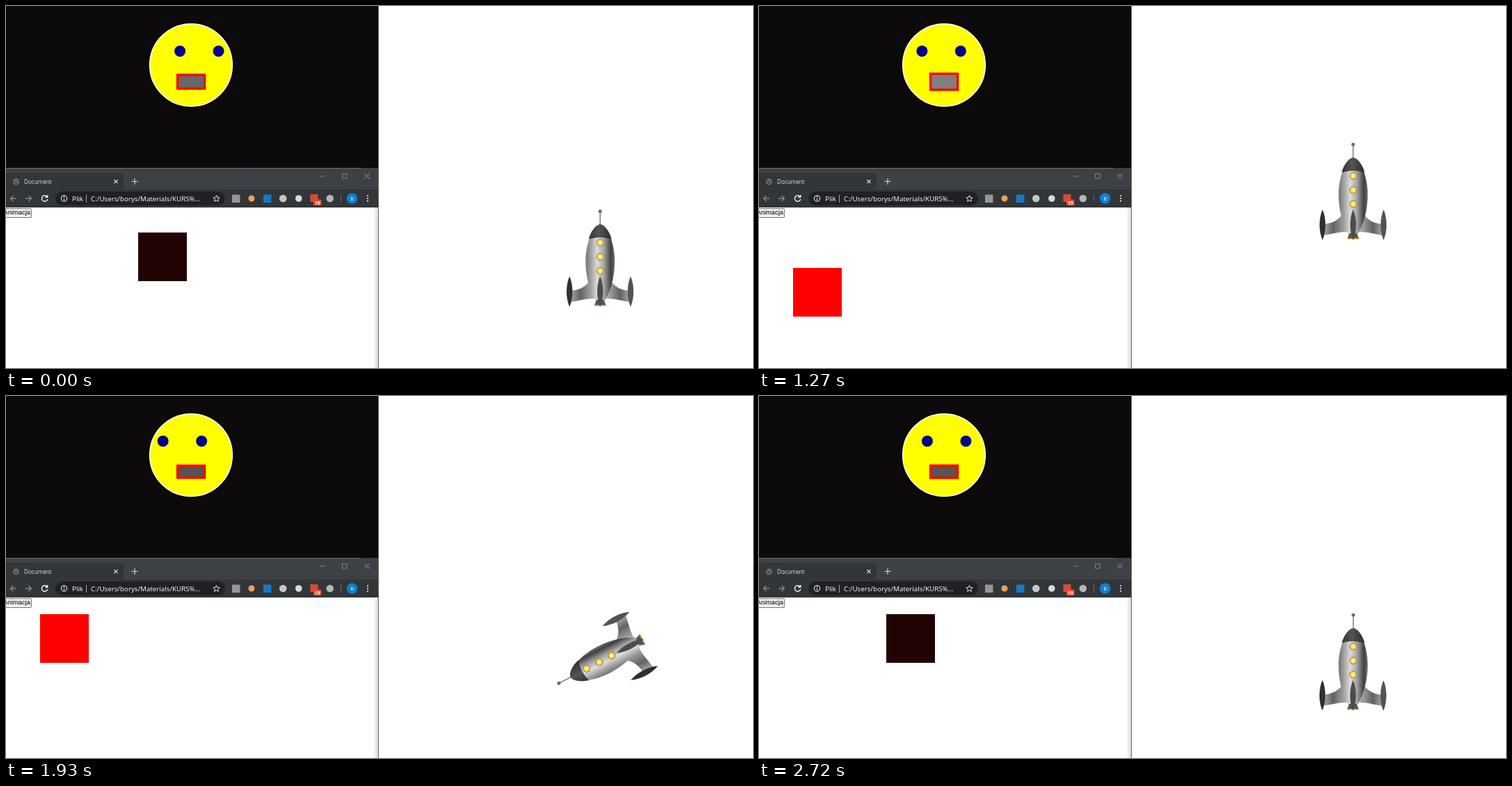
Animation of 1074 by 521 pixels, one loop 2.78 s. Source, as an HTML page:

```html
<!DOCTYPE html>
<html lang="pl">
<head>
<meta charset="utf-8">
<title>Animacje</title>
<style>
  html, body { margin: 0; width: 100%; height: 100%; overflow: hidden; background: #fff; }
  svg { display: block; width: 1074px; height: 521px; }
  .ui { font-family: "Open Sans", "Noto Sans", sans-serif; }
  .line { fill: none; stroke-width: 1.1; }
</style>
</head>
<body>
<svg viewBox="0 0 1074 521">
  <defs>
    <linearGradient id="metal">
      <stop offset="0" stop-color="#747474"/>
      <stop offset=".18" stop-color="#a0a0a0"/>
      <stop offset=".4" stop-color="#dcdcdc"/>
      <stop offset=".62" stop-color="#a8a8a8"/>
      <stop offset=".87" stop-color="#404040"/>
      <stop offset="1" stop-color="#707070"/>
    </linearGradient>
    <linearGradient id="wing">
      <stop offset="0" stop-color="#a8a8a8"/>
      <stop offset=".4" stop-color="#626262"/>
      <stop offset="1" stop-color="#b4b4b4"/>
    </linearGradient>
    <linearGradient id="cone">
      <stop offset="0" stop-color="#333335"/>
      <stop offset=".45" stop-color="#545456"/>
      <stop offset="1" stop-color="#2c2c2e"/>
    </linearGradient>
    <radialGradient id="lamp">
      <stop offset="0" stop-color="#fff6c8"/>
      <stop offset=".5" stop-color="#fbe27a"/>
      <stop offset="1" stop-color="#eec025"/>
    </radialGradient>
    <linearGradient id="edge">
      <stop offset="0" stop-color="#fff"/>
      <stop offset="1" stop-color="#d8d8d8"/>
    </linearGradient>
    <clipPath id="page"><rect y="290" width="535" height="231"/></clipPath>
    <path id="side" fill="url(#wing)" d="M837 418C831 426 822 429 812 430V446C824 444 834 441 846 441Z"/>
    <path id="fin" d="M0 -22C5.6 -9 5.6 9 0 22C-5.6 9 -5.6 -9 0 -22Z"/>
    <circle id="window" r="5" fill="url(#lamp)" stroke="#8d7b3c" stroke-width=".9"/>
  </defs>

  <!-- face -->
  <rect width="535" height="234" fill="#0c0a0b"/>
  <circle cx="266" cy="85" r="59.3" fill="#ff0" stroke="#fff" stroke-width="1.6"/>
  <g id="eyes" fill="#00008b"><circle cy="65" r="8"/><circle cx="55.5" cy="65" r="8"/></g>
  <rect id="mouth" x="246.6" width="39" stroke="#f00" stroke-width="3.4"/>

  <!-- browser window -->
  <g class="ui">
    <rect y="233" width="535" height="32" fill="#3d4145"/>
    <path d="M0 233.5H510" stroke="#6b6f72"/>
    <path d="M0 240H163Q169 240 169 246V264H535V290H0Z" fill="#323639"/>
    <circle cx="14.5" cy="253" r="4.6" fill="#6f7376"/>
    <path class="line" stroke="#36393c" d="M10.5 251.5Q14 254 18.5 251M12 256Q15 253 17 256.5"/>
    <text x="26" y="255.7" font-size="8.1" fill="#dfe1e5">Document</text>
    <g class="line" stroke="#dcdcdc">
      <path d="M155.3 250l5.2 5.2m0-5.2l-5.2 5.2M180.5 252.500h9m-4.5-4.5v9"/>
      <path stroke="#7c8083" d="M451 245h8M483.500 241.500h6.500v6.500h-6.500ZM515.500 241.500l7 7m0-7l-7 7"/>
      <path stroke="#85898d" stroke-width="1.3" d="M15 277H6.500m4-4l-4 4l4 4M28 277h8.500m-4-4l4 4l-4 4"/>
      <path stroke="#f1f3f4" stroke-width="1.4" d="M59 274.500A4.200 4.200 0 1 0 59.700 278M59.700 272v3.300h-3.300"/>
    </g>
    <rect x="71" y="267" width="244" height="20" rx="10" fill="#202124"/>
    <g class="line" stroke="#e8eaed">
      <circle cx="83.5" cy="277" r="4.1"/>
      <path d="M83.5 276.500v3M83.500 274.300v1.100"/>
      <path stroke="#9aa0a6" d="M115.5 272v11"/>
      <path stroke-width="1" d="M302.5 272.600l1.300 3l3.300.300l-2.500 2.200l.700 3.200l-2.800-1.700l-2.800 1.700l.700-3.200l-2.500-2.200l3.300-.300Z"/>
    </g>
    <g font-size="9.8" fill="#fff">
      <text x="95" y="280.6">Plik</text>
      <text x="122" y="280.6">C:/Users/borys/Materials/KURS%...</text>
    </g>
    <rect x="325" y="271.5" width="11.5" height="11.5" fill="#969696"/>
    <circle cx="353" cy="277" r="4.5" fill="#e9a25c"/>
    <rect x="370" y="271.5" width="11.5" height="11.5" fill="#1878c8"/>
    <circle cx="398.3" cy="277" r="5.3" fill="#c4c6c8"/>
    <circle cx="420.8" cy="277" r="4.8" fill="#d8dadc"/>
    <rect x="437.5" y="271" width="11" height="11" fill="#d94a3a"/>
    <circle cx="465.8" cy="277" r="5.3" fill="#b4b6b7"/>
    <rect x="442" y="278.5" width="11.5" height="8.5" rx="1.5" fill="#ea4a28"/>
    <text x="447.7" y="285.5" font-size="7" font-weight="700" text-anchor="middle" fill="#fff">19</text>
    <path d="M481.5 271.500v11" stroke="#64686c"/>
    <circle cx="497.6" cy="277" r="7.8" fill="#0c80cf"/>
    <text x="497.6" y="279.8" font-size="7.5" text-anchor="middle" fill="#fff">B</text>
    <g fill="#e8eaed"><circle cx="520" cy="273.3" r="1.1"/><circle cx="520" cy="277" r="1.1"/><circle cx="520" cy="280.7" r="1.1"/></g>
  </g>

  <g clip-path="url(#page)">
    <rect x="-8" y="291.5" width="44.5" height="13" rx="1.5" fill="#efefef" stroke="#767676"/>
    <text x="-3.5" y="300.3" font-size="9.4" font-family="Arial, 'Liberation Sans', sans-serif">Animacja</text>
    <rect id="box" width="70" height="70"/>
    <rect x="528" y="290" width="7" height="231" fill="url(#edge)"/>
  </g>
  <path d="M535.5 0V521" stroke="#6a6a6a"/>

  <!-- rocket, drawn at rest -->
  <g id="rocket">
    <path d="M854.2 316V336" stroke="#747474" stroke-width="1.4"/>
    <circle cx="854.2" cy="315.3" r="2.5" fill="#6c6c6e"/>
    <use href="#side"/>
    <use href="#side" transform="matrix(-1 0 0 1 1708.4 0)"/>
    <path d="M849 442H859.500L862.500 451H846Z" fill="#57575a"/>
    <path d="M846 450H862.500V451.500H846Z" fill="#b98f22"/>
    <path fill="url(#metal)" d="M854.2 334C845 335 833.300 360 833.300 387C833.300 408 838 427 847 443H861.500C870.500 427 875.200 408 875.200 387C875.200 360 863.500 335 854.200 334Z"/>
    <path fill="url(#cone)" d="M854.2 334C847.500 335 840.500 345 837.800 355.500Q854.200 350.500 870.700 355.500C868 345 861 335 854.200 334Z"/>
    <use href="#window" x="854.3" y="360.5"/>
    <use href="#window" x="854.3" y="380.8"/>
    <use href="#window" x="854.3" y="401"/>
    <use href="#fin" x="810.2" y="431" fill="#2f2f31"/>
    <use href="#fin" x="898" y="431" fill="#535355"/>
    <use href="#fin" x="854.2" y="431" fill="#4c4c4f"/>
  </g>
</svg>
<script>
const LOOP = 2780;
const $ = id => document.getElementById(id);
const mod = (a, n) => ((a % n) + n) % n;
const lerp = (a, b, p) => a + (b - a) * p;

// The CSS "ease" curve, cubic-bezier(.25, .1, .25, 1)
function ease(x) {
  const curve = (a, b, u) => 3 * a * u * (1 - u) ** 2 + 3 * b * u * u * (1 - u) + u ** 3;
  let low = 0, high = 1;
  for (let i = 0; i < 20; i++) {
    const mid = (low + high) / 2;
    if (curve(.25, .25, mid) < x) low = mid; else high = mid;
  }
  return curve(.1, 1, low);
}

// The recording opens on a late moment, holds, then moves in runs of
// even steps: [first, last, number of steps]
const runs = [[760, 1270, 10], [1330, 1800, 9], [1870, 2380, 10], [2440, 2720, 6]];
function clock(t) {
  if (t < 20) return 3116;
  if (t < 760) return 700;
  const [first, last, count] = runs.filter(r => r[0] <= t).pop();
  const gap = (last - first) / (count - 1);
  return first + gap * Math.min(count - 1, Math.floor((t - first) / gap + .1));
}

function drawFace(t) {
  const eyeX = 223.3 + .0205 * Math.abs(t - 1810);
  $("eyes").setAttribute("transform", `translate(${eyeX} 0)`);

  const wave = Math.abs(mod(t - 230, 1050) - 525) / 525; // 1 open, 0 nearly shut
  const open = lerp(.33, 1, Math.sqrt(wave));
  const height = 6.2 + 17 * open, grey = 128 * open;
  $("mouth").setAttribute("y", 109 - height / 2);
  $("mouth").setAttribute("height", height);
  $("mouth").setAttribute("fill", `rgb(${grey},${grey},${grey})`);
}

// The box walks round a square, easing along each side.
const corners = [[49, 455], [49, 314], [190, 314], [190, 455]];
function drawBox(t) {
  const walk = (t - 937) / 1040, leg = mod(Math.floor(walk), 4);
  const p = ease(mod(walk, 1));
  const [x0, y0] = corners[leg], [x1, y1] = corners[(leg + 1) % 4];
  const red = 255 * [1, .13, .13, p][leg];
  $("box").setAttribute("x", Math.round(lerp(x0, x1, p)));
  $("box").setAttribute("y", Math.round(lerp(y0, y1, p)));
  $("box").setAttribute("fill", `rgb(${red},${leg % 3 ? 3 : 0},${leg % 3 ? 4 : 0})`);
}

// The rocket speeds upwards, then spins once back at its base.
function drawRocket(t) {
  const phase = mod(t - 700, 2180);
  const pose = phase < 1060
    ? `translate(0 ${-3.57e-4 * phase ** 2})`
    : `rotate(${-360 * ease(Math.min(1, (phase - 1000) / 1060))} 854.2 382.3)`;
  $("rocket").setAttribute("transform", pose);
}

const start = performance.now();
function tick() {
  const t = clock((performance.now() - start) % LOOP);
  drawFace(t);
  drawBox(t);
  drawRocket(t);
  requestAnimationFrame(tick);
}
tick();
</script>
</body>
</html>
```
